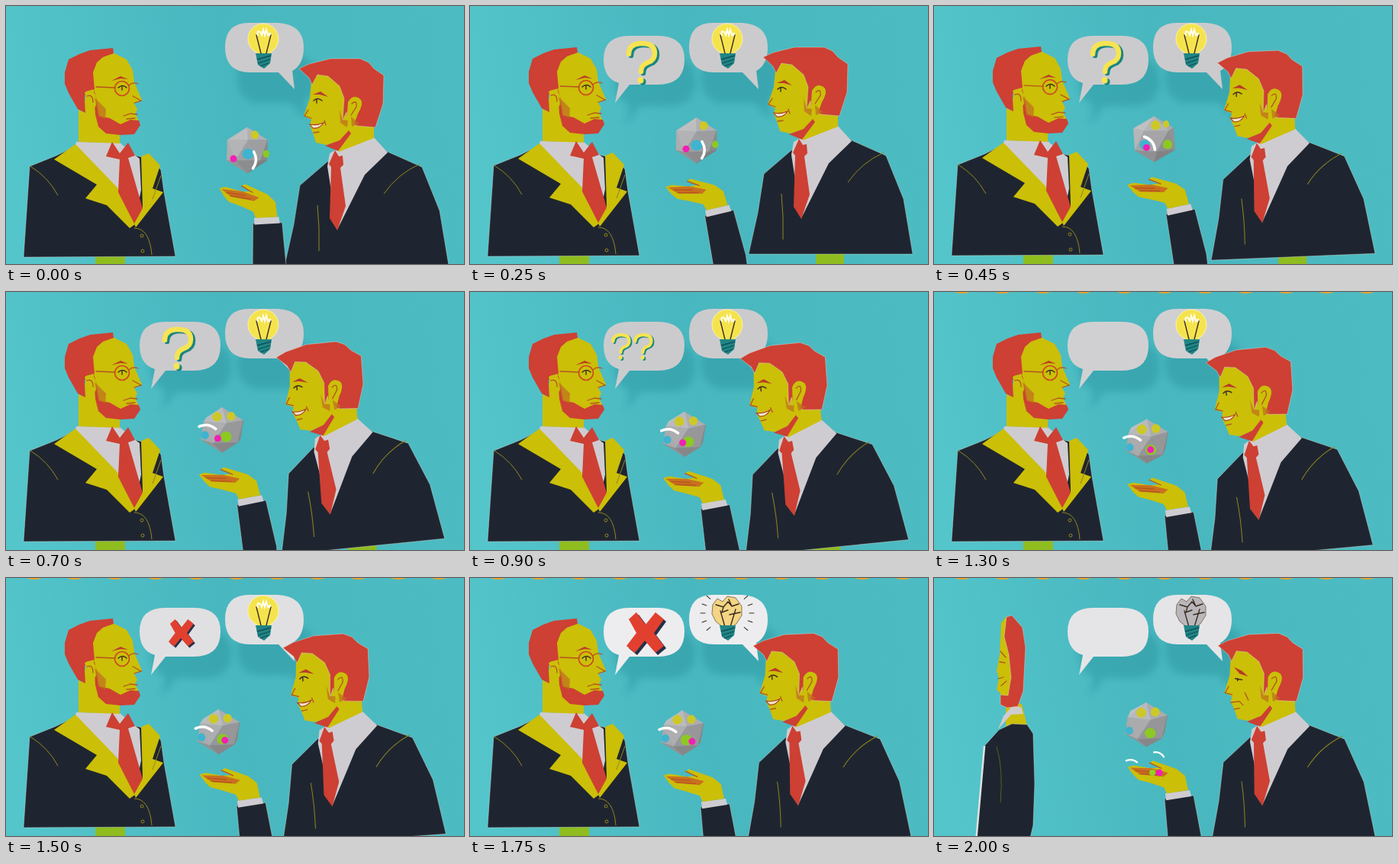
Animation of 600 by 338 pixels, one loop 2050 ms. Source, as an HTML page:

```html
<!DOCTYPE html>
<html lang="en">
<head>
<meta charset="utf-8">
<title>Two men and an idea</title>
<style>
html, body { margin: 0; width: 100%; height: 100%; overflow: hidden; background: #4bbac2; }
svg { display: block; width: 100vw; height: 100vh; }
.skin { fill: #cbbf08; }
.red { fill: #cd4033; }
.suit { fill: #1f2530; }
.shirt { fill: #cfccd1; }
.edge { stroke: #dde6dd; stroke-opacity: .5; stroke-width: .8; stroke-linejoin: round; }
.line { fill: none; stroke: #8f871f; stroke-width: 1; }
.ink { fill: none; stroke: #b5531f; stroke-width: 1.3; stroke-linecap: round; }
.dark { fill: none; stroke: #3b2c22; stroke-width: 1.4; stroke-linecap: round; stroke-linejoin: round; }
.blush { fill: #c0701e; opacity: .75; }
.stick { fill: #8fbd1f; }
.cast { fill: #17818e; opacity: .3; filter: url(#blur); }
</style>
</head>
<body>
<svg viewBox="0 0 600 338" preserveAspectRatio="none">
<defs>
  <linearGradient id="wall" x1="0" y1=".5" x2="1" y2=".4">
    <stop offset="0" stop-color="#54c5cb"/><stop offset=".5" stop-color="#49b7bf"/><stop offset="1" stop-color="#4dbcc2"/>
  </linearGradient>
  <filter id="blur" x="-50%" y="-50%" width="200%" height="200%"><feGaussianBlur stdDeviation="5"/></filter>
  <path id="saysLeft" d="M209 39H246Q281 39 281 70Q281 103 246 103H209L190 127L195 101Q175 95 175 70Q175 39 209 39Z"/>
  <path id="saysRight" d="M319 22H356Q390 24 390 54Q390 77 375 85L378 109L357 87H320Q287 87 287 54Q287 22 319 22Z"/>
  <g id="markShape" fill="none" stroke-width="6.5" stroke-linecap="round">
    <path d="M208 63Q208 49 225 49Q242 49 242 62Q242 71 233 74Q224 77 224 86"/>
    <path d="M223.5 97V97.500" stroke-width="8"/>
  </g>
  <g id="mark"><use href="#markShape" x="3" y="2" stroke="#1b8580"/><use href="#markShape" stroke="#f6e452"/></g>
  <path id="cross" d="M208 54L218 45L230 61L243 45L254 54L241 72L254 89L243 98L229 82L216 98L205 89L218 72Z"/>
</defs>
<rect width="600" height="338" fill="url(#wall)"/>
<g id="dots" fill="#eda42c"></g>

<use href="#saysRight" class="cast" x="16" y="40"/>
<use id="shade" href="#saysLeft" class="cast" x="14" y="28"/>

<use id="leftBubble" href="#saysLeft"/>
<g id="marks"></g>
<g id="no"><use href="#cross" x="3" y="3" fill="#26304a"/><use href="#cross" fill="#e2402f"/></g>

<use id="rightBubble" href="#saysRight"/>
<g id="lit">
  <circle cx="337" cy="43" r="20" fill="#f5e34e" stroke="#fff6bb" stroke-width=".8"/>
  <path d="M329 55H346V65H329Z" fill="#f5e34e"/>
  <path class="dark" d="M328 38L334 62M347 38L341 62" stroke-width="1.800"/>
  <path d="M330 39Q328 31 333 34L335 38L337 31L339 38L341 31L343 38Q348 33 345 39" fill="none" stroke="#fffef0" stroke-width="2"/>
</g>
<g id="broken">
  <path id="glass" d="M318 35L324 27L331 31L337 24L348 26L356 37L356 49L349 60L343 64H331L322 57L317 47Z" stroke="#7b6953" stroke-width=".9"/>
  <path class="dark" d="M328 43L334 64M348 41L341 64M322 35L332 38L338 31L343 37L339 28M332 38L330 45L338 42M343 37L352 34M340 48L354 45" stroke-width="1.100"/>
</g>
<g id="rays" class="dark"></g>
<path d="M327 62H348L346 75L338 82L330 77Z" fill="#1f8585"/>
<path d="M329 70L347 65M330 75L346 70M333 79L344 75" stroke="#134e57" stroke-width="1.300"/>

<g id="left">
  <path class="stick" d="M117 320H156V345H117Z"/>
  <path class="suit edge" d="M31 209L66 195L92 182L150 190L178 197L187 193L203 214L207 243L222 327L23 328Z"/>
  <path class="shirt" d="M92 177L149 178L163 190L175 199L177 240L168 285L146 245L90 184Z"/>
  <path class="skin" d="M63 200L91 180L146 237L169 285L162 290L132 260L104 251L119 233Z"/>
  <path class="skin" d="M177 196L187 192L202 208L192 238L206 243L170 289L167 282L179 262Z"/>
  <path class="skin" d="M95 135L95 177L149 179V160Z"/>
  <path class="red" d="M139 177L149 192L160 178L169 195L160 198L179 264L168 284L147 243L149 200L131 196Z"/>
  <path class="skin" d="M113 72L127 62L142 61L158 69L166 83L168 99L178 122L168 127L172 134L169 140L174 150L160 164L125 160L100 140Z"/>
  <path class="red" d="M77 86L82 69L96 62L110 57L140 54L141 61L127 66L119 73L114 86L116 108L108 110Q103 110 103 122L104 139L94 134L82 113L77 101Z"/>
  <path class="red" d="M115 108L119 122L122 143L136 146L150 154L163 148L174 149L176 155L168 167L150 168L131 166L121 157L117 141Z"/>
  <path class="skin" d="M103 112Q114 106 118 118Q121 133 110 135Z"/>
  <path class="blush" d="M116 119L131 134L130 147L121 143Z"/>
  <path class="ink" d="M106 117Q114 114 114 125M154 143L163 140L172 141M158 147L169 146" stroke-width="1.800"/>
  <path d="M138 97L150 91L160 95L150 94Z" fill="#bd3b26"/>
  <circle cx="152" cy="107" r="9.500" fill="none" stroke="#cc4a21" stroke-width="1.700"/>
  <path class="ink" d="M118 105L143 106M161 103Q166 98 173 101M166 117L177 123L168 126"/>
  <path class="dark" d="M147 106Q153 101 158 106M152 105V109"/>
  <path class="line" d="M32 209Q55 223 68 247M203 221L192 252M168 290Q188 290 191 325"/>
  <g class="line"><circle cx="178" cy="300" r="2"/><circle cx="179" cy="320" r="2"/></g>
</g>
<g id="back">
  <path class="skin" d="M94 163L115 165L122 193L94 194Z"/>
  <path class="suit edge" d="M66 220L85 199L102 191L122 192L130 204L132 270L130 324L125 345H55Z"/>
  <path class="shirt" d="M84 198L91 181L102 168L114 169L117 178L101 179Z"/>
  <path class="skin" d="M88 59L95 50L101 70L103 150L97 168L87 166L87 151L82 146L85 131L82 121L86 101Z"/>
  <path class="red edge" d="M95 51L102 49L116 65L120 91L117 148L110 168L96 170L87 166L87 153L97 154L101 130L98 100L92 77Z"/>
  <path class="ink" d="M87 96L94 104M86 110L93 111M84 132L91 130M88 141L95 135" stroke-width="1.600"/>
  <path d="M66 220L55 345" stroke="#dfe3e3" stroke-width="2.500"/>
  <path class="line" d="M82 221Q91 250 87 294" opacity=".55"/>
</g>

<g id="right">
  <path class="stick" d="M453 330H490V362H453Z"/>
  <path class="suit edge" d="M421 204L385 235L377 286L365 340H580L568 268L545 211L500 191L480 180Z"/>
  <path class="shirt" d="M424 193L436 186L481 171L500 192L470 221L434 293L421 210Z"/>
  <path class="skin" d="M430 150L482 145V173L436 191Z"/>
  <path class="red" d="M431 189L436 197L441 196L442 208L438 212L445 262L434 294L424 278L426 211L423 207Z"/>
  <path class="skin" d="M401 88L440 82L470 110L468 155L450 162L437 177L420 182L406 179L402 166L398 156L400 149L390 144L398 121Z"/>
  <path class="red" d="M418 183L437 176L449 163L452 167L435 190Z"/>
  <path class="red edge" d="M384 82L397 76L425 69L464 69L475 74L482 82L495 91L494 128L484 159L460 157L447 150L446 139L441 150L443 121L437 105L422 92L408 90L401 103L397 94Z"/>
  <path class="skin" d="M448 126Q454 115 463 121Q470 126 461 141L455 158L446 154Z"/>
  <path class="blush" d="M437 136L441 149L448 150L447 159L438 153ZM452 145L463 154L453 158Z"/>
  <path class="ink" d="M453 128Q460 122 459 132L452 143M396 136L391 144L400 147"/>
  <g id="smile">
    <path d="M402 116L412 112L422 119L411 116Z" fill="#b93a28"/>
    <path class="dark" d="M403 124Q408 119 414 124M407 122V127"/>
    <path d="M398 155Q407 157 416 153Q411 161 402 160Z" fill="#efe6c8" stroke="#a83820" stroke-width="1.100"/>
    <path class="ink" d="M403 166L410 165M417 150L419 156"/>
  </g>
  <g id="frown">
    <path d="M404 111L414 116L422 124L411 120Z" fill="#b93a28"/>
    <path class="dark" d="M405 126L414 128M408 126V129"/>
    <path class="ink" d="M398 157L409 156L414 161M402 166L409 165M417 145L421 155" stroke-width="1.700"/>
  </g>
  <path class="line" d="M542 207Q513 220 495 246M408 261Q411 291 410 321"/>
</g>

<g id="gem"></g>
<g id="arm">
  <path class="suit edge" d="M302 289L340 285L351 345L353 390H310Z"/>
  <path class="shirt" d="M303 282L335 278L337 286L304 291Z"/>
  <path class="skin" d="M254 247L262 245L284 249L296 248L283 242L287 239L304 245L318 250L329 259L333 278L305 282L301 274L283 268L268 264L261 257Z"/>
  <path d="M257 248L285 249L307 255L301 260L270 257Z" fill="#c9701f"/>
  <path class="ink" d="M264 252L289 254M270 256L296 258M283 242L298 249" stroke-width=".9"/>
</g>
<g id="bits"></g>
</svg>

<script>
const LOOP = 2050, STEP = 50, TAU = Math.PI * 2;
const $ = id => document.getElementById(id);

// Eased progress from 0 to 1 between two times.
function ease(t, from, to) {
  const p = Math.max(0, Math.min(1, (t - from) / (to - from)));
  return p * p * (3 - 2 * p);
}
const show = (id, on) => $(id).setAttribute('display', on ? 'inline' : 'none');
const move = (id, value) => $(id).setAttribute('transform', value);
const scaleAt = (x, y, sx, sy = sx) => `translate(${x} ${y}) scale(${sx} ${sy}) translate(${-x} ${-y})`;
const grey = v => `rgb(${v},${v},${v + 2})`;

// The palm floats once per loop; a second harmonic sharpens the rise.
function palm(t) {
  const w = t / LOOP * TAU;
  return {
    x: 320 + 22 * Math.exp(-t / 170),
    y: 280 - 13.5 * Math.sin(w) - 3.5 * Math.sin(2 * w),
    turn: 14 * Math.exp(-t / 90) - 9 * Math.exp(-t / 600)
  };
}

// Icosahedron: two poles and two rings of five.
const ring = (y, shift) => [0, 1, 2, 3, 4].map(i => {
  const a = (i + shift) * TAU / 5;
  return [.894 * Math.sin(a), y, .894 * Math.cos(a)];
});
const verts = [[0, -1, 0], ...ring(-.447, 0), ...ring(.447, .5), [0, 1, 0]];
const faces = [];
for (let i = 0; i < 5; i++) {
  const n = (i + 1) % 5;
  faces.push([0, 1 + i, 1 + n], [1 + i, 1 + n, 6 + i], [6 + i, 6 + n, 1 + n], [11, 6 + i, 6 + n]);
}
const spotOn = { 0: '#cdc828', 16: '#cdc828', 18: '#8cc922', 14: '#3fb4cf' };

const ball = (x, y, rx, ry, c) => `<ellipse cx="${x}" cy="${y}" rx="${rx}" ry="${ry}" fill="${c}"/>`;
const streak = (x, y, turn, size) => `<path d="M-11 2Q0 -5 11 2" transform="translate(${x} ${y}) rotate(${turn}) scale(${size})" fill="none" stroke="#fff" stroke-width="3.5" stroke-linecap="round"/>`;

function solid(cx, cy, yaw, tilt) {
  const [cw, sw, ct, st] = [Math.cos(yaw), Math.sin(yaw), Math.cos(tilt), Math.sin(tilt)];
  const points = verts.map(([x, y, z]) => {
    const depth = z * cw - x * sw;
    return [x * cw + z * sw, y * ct + depth * st, depth * ct - y * st];
  });
  let sides = '', spots = '';
  faces.forEach((f, i) => {
    const [x, y, z] = [0, 1, 2].map(k => f.reduce((sum, v) => sum + points[v][k], 0) / 3);
    if (z <= 0) return;
    const tone = grey(Math.round(158 - 34 * y - 24 * x + 10 * z));
    const corners = f.map(v => (cx + 31 * points[v][0]) + ',' + (cy + 30 * points[v][1]));
    sides += `<polygon points="${corners.join(' ')}" fill="${tone}" stroke="${tone}" stroke-width=".5"/>`;
    if (spotOn[i]) spots += ball(cx + 33 * x, cy + 32 * y, 3 + 6 * z, 4 + 4 * z, spotOn[i]);
  });
  return sides + spots;
}

function drawGem(t, hand, drop) {
  const x = 278 + 38 * Math.exp(-t / 350), y = hand.y - 91;
  const turned = ease(t, 200, 700);
  $('gem').innerHTML = solid(x, y, .2 + 1.1 * (1 - turned), .23 * turned + .06 * Math.sin(t / 150));
  const low = 52 * drop;
  let out = ball(x - 18 + 35 * t / 2000, y + 11 + low, 4.5, 4.5, '#f21fb4') +
    streak(x + 10 - 29 * turned, y + 13 - 18 * turned + low, 85 * (1 - turned) + 8, 1 - .35 * drop);
  if (drop > 0) out += ball(x + 8, y + 11 + low, 4 * drop, 4 * drop, '#8ed520') + streak(x + 17, y - 14 + low, 25, .65 * drop);
  $('bits').innerHTML = out;
}

function drawMarks(t) {
  const mark = (x, y, s) => `<use href="#mark" transform="translate(${x} ${y}) scale(${s}) translate(-225 -73)"/>`;
  let out = '';
  if (t < 850) out = mark(225, 73, ease(t, 50, 220));
  else if (t < 1200) {
    const count = Math.min(3, 1 + Math.floor((t - 850) / 50));
    for (let i = 0; i < count; i++) out += mark(198 + i * 29, 71, .62);
  }
  $('marks').innerHTML = out;
}

// The paper cut-out swings about its upright axis until its back shows.
function drawLeft(t) {
  const p = Math.max(0, (t - 1750) / 250);
  const width = Math.cos(1.97 * Math.pow(p, 1.3));
  show('left', width > 0);
  show('back', width <= 0);
  move('left', `translate(${-27 * p} ${1 - 2 * ease(t, 0, 500)}) ` + scaleAt(122, 0, Math.max(.02, width), 1));
  move('back', scaleAt(95, 0, Math.max(.05, -width / .39), 1));
}

function drawRight(t) {
  const lean = ease(t, 250, 700) - .6 * ease(t, 1150, 1850);
  const y = -15 * ease(t, 0, 250) + 9 * ease(t, 250, 700) + 9 * ease(t, 700, 1500);
  move('right', `translate(${-5 * lean} ${y}) rotate(${-5.7 * lean} 470 338)`);
  show('smile', t < 1850);
  show('frown', t >= 1850);
}

function draw(t) {
  const hand = palm(t), drop = ease(t, 1800, 2000);
  drawLeft(t);
  drawRight(t);
  move('arm', `translate(${hand.x - 320} ${hand.y - 283}) rotate(${hand.turn} 320 283)`);
  drawGem(t, hand, drop);

  const pop = scaleAt(190, 127, ease(t, 0, 200));
  const paper = grey(Math.round(203 + 34 * ease(t, 1150, 1750) - 8 * drop));
  for (const id of ['leftBubble', 'shade']) move(id, pop);
  for (const id of ['leftBubble', 'rightBubble']) $(id).setAttribute('fill', paper);
  drawMarks(t);
  show('no', t >= 1450 && t < 1900);
  move('no', scaleAt(229, 72, ease(t, 1420, 1550)));

  show('lit', t < 1550);
  show('broken', t >= 1550);
  show('rays', t >= 1550 && t < 1850);
  $('glass').setAttribute('fill', t < 1850 ? '#f3d583' : '#b9b7bb');
  move('dots', `translate(0 ${6 * ease(t, 1100, 1250) - 6})`);
}

for (let i = 0; i < 11; i++) $('dots').innerHTML += ball(37 + i * 53, -5, 14, 7, '#eda42c');
for (let i = 0; i < 10; i++) {
  const side = i < 5 ? 0 : 180;
  $('rays').innerHTML += `<path d="M29 0H35" stroke-width="1" transform="translate(337 46) rotate(${side - 40 + (i % 5) * 20})"/>`;
}

const start = performance.now();
function frame(now) {
  const t = Math.max(0, now - start) % LOOP;
  draw(Math.floor(t / STEP) * STEP);
  requestAnimationFrame(frame);
}
draw(0);
requestAnimationFrame(frame);
</script>
</body>
</html>
```
